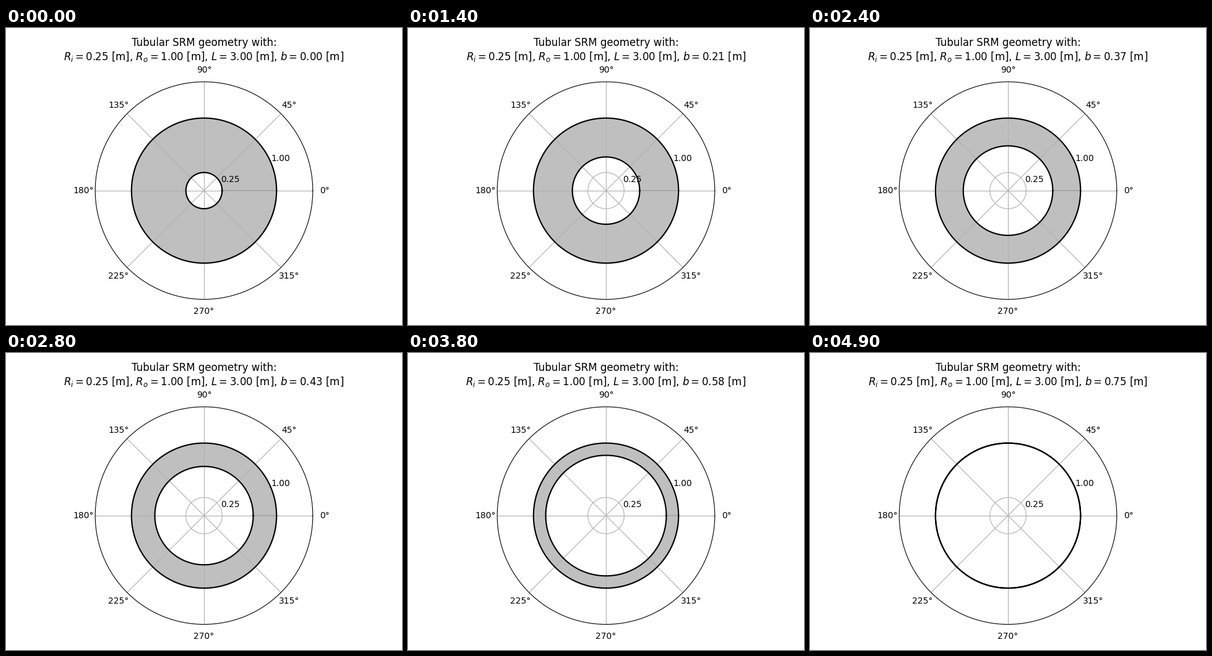
A matplotlib script that plays this animation: 640 px wide and 480 px high, repeating every 5000 ms.

```python
import numpy as np
import matplotlib.pyplot as plt
from matplotlib.animation import FuncAnimation

R_INNER, R_OUTER, LENGTH = 0.25, 1.0, 3.0
FRAMES, INTERVAL = 50, 100

plt.rcParams["font.family"] = "DejaVu Sans"

burn_depths = np.linspace(0, R_OUTER - R_INNER, FRAMES)
theta = np.linspace(0, 2 * np.pi, 200)

fig, ax = plt.subplots(figsize=(6.4, 4.8), dpi=100,
                       subplot_kw={"projection": "polar"})


def circle(radius):
    return np.full_like(theta, radius)


def title_text(b):
    return ("Tubular SRM geometry with:\n"
            f"$R_i = {R_INNER:.2f}$ [m], $R_o = {R_OUTER:.2f}$ [m], "
            f"$L = {LENGTH:.2f}$ [m], $b = {b:.2f}$ [m]")


ax.plot(theta, circle(R_OUTER), color="black", lw=1.5)
bore, = ax.plot(theta, circle(R_INNER), color="black", lw=1.5)
ax.set_ylim(0, 1.5 * R_OUTER)
ax.set_yticks([R_INNER, R_OUTER], labels=[f"{R_INNER:.2f}", f"{R_OUTER:.2f}"])
title = ax.set_title(title_text(0))
fig.tight_layout()

grain = []


def update(frame):
    b = burn_depths[frame]
    while grain:
        grain.pop().remove()
    # The translucent edge leaves a faint seam at zero degrees.
    grain.append(ax.fill_between(theta, circle(R_INNER + b), circle(R_OUTER),
                                 color="gray", alpha=0.5))
    ax.set_ylim(0, 1.5 * R_OUTER)
    bore.set_ydata(circle(R_INNER + b))
    title.set_text(title_text(b))
    return bore, title, *grain


anim = FuncAnimation(fig, update, frames=FRAMES, interval=INTERVAL,
                     repeat=True, repeat_delay=0)
plt.show()
```
